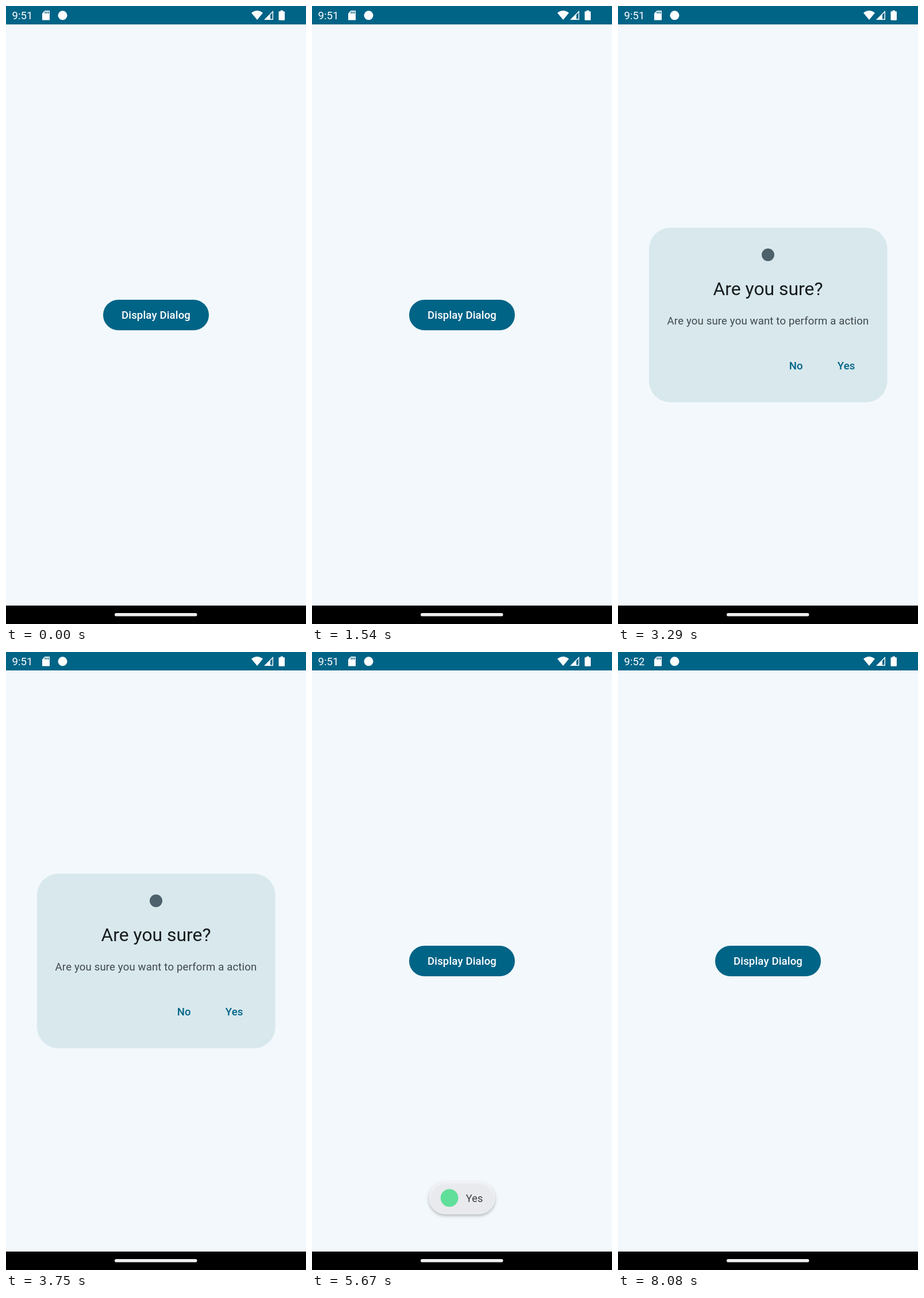
An HTML page with a canvas that plays this animation: 522 by 1073 pixels, repeating every 8120 ms.

```html
<!DOCTYPE html>
<html lang="en">
<head>
<meta charset="utf-8">
<title>Confirm dialog</title>
<style>
html, body { margin: 0; width: 100%; height: 100%; overflow: hidden; background: #f2f8fb; }
canvas { display: block; width: 522px; height: 1073px; }
</style>
</head>
<body>
<canvas id="stage" width="522" height="1073"></canvas>
<script>
const W = 522, H = 1073, LOOP = 8120;
const g = document.getElementById('stage').getContext('2d');
const PRIMARY = '#006487';

// Event times in ms
const T = {
  press: 2690, dialogIn: 2960,
  yesPress: 5305, dialogOut: 5450,
  toastIn: 5580, clock: 5900, toastOut: 7750
};

const clamp = v => Math.max(0, Math.min(1, v));
const part = (t, start, length) => clamp((t - start) / length);
const easeOut = p => 1 - (1 - p) ** 3;
const easeIn = p => p * p;

function box(x, y, w, h, r, color) {
  g.beginPath();
  g.roundRect(x, y, w, h, r);
  g.fillStyle = color;
  g.fill();
}

function circle(x, y, r, color) {
  g.beginPath();
  g.arc(x, y, r, 0, Math.PI * 2);
  g.fillStyle = color;
  g.fill();
}

function polygon(points, color) {
  g.beginPath();
  points.forEach(([x, y]) => g.lineTo(x, y));
  g.closePath();
  g.fillStyle = color;
  g.fill();
}

function label(text, x, y, { size = 18.6, weight = 400, color = '#fff', spacing = 0, align = 'center' } = {}) {
  g.font = `${weight} ${size}px Roboto, sans-serif`;
  g.letterSpacing = spacing + 'px';
  g.textAlign = align;
  g.fillStyle = color;
  g.fillText(text, x, y);
}

// Draws a group with opacity and scale around a centre
function group(cx, cy, scale, alpha, draw) {
  if (alpha <= 0) return;
  g.save();
  g.globalAlpha = alpha;
  g.translate(cx, cy);
  g.scale(scale, scale);
  g.translate(-cx, -cy);
  draw();
  g.restore();
}

// Soft-edged touch ripple clipped to a pill
function ripple(x, y, w, h, from, radius, p, rgb, alpha) {
  if (p <= 0 || alpha <= 0) return;
  const cx = from[0] + (x + w / 2 - from[0]) * p;
  const cy = from[1] + (y + h / 2 - from[1]) * p;
  const r = 5 + radius * p;
  const fill = g.createRadialGradient(cx, cy, 0, cx, cy, r);
  fill.addColorStop(0, `rgba(${rgb},${alpha})`);
  fill.addColorStop(0.7, `rgba(${rgb},${alpha})`);
  fill.addColorStop(1, `rgba(${rgb},0)`);
  box(x, y, w, h, h / 2, fill);
}

function statusBar(t) {
  g.fillStyle = PRIMARY;
  g.fillRect(0, 0, W, 32);
  label(t < T.clock ? '9:51' : '9:52', 10.5, 23, { align: 'left' });

  // Memory card
  polygon([[67.5, 8], [76, 8], [76, 24.5], [63, 24.5], [63, 13]], '#fff');
  g.fillStyle = PRIMARY;
  [67.5, 70.3, 73.1].forEach(x => g.fillRect(x, 9.5, 1.5, 3.5));

  circle(98.5, 16.3, 8, '#fff');

  // Wi-Fi fan
  g.beginPath();
  g.moveTo(437, 24);
  g.lineTo(427, 12);
  g.quadraticCurveTo(437, 4, 447, 12);
  g.closePath();
  g.fillStyle = '#fff';
  g.fill();

  // Signal
  polygon([[449, 24], [465, 8], [465, 24]], '#fff');
  polygon([[460, 15], [463.6, 11.4], [463.6, 22.5], [460, 22.5]], PRIMARY);

  // Battery
  box(474.5, 9.2, 10.5, 15.6, 1.2, '#fff');
  g.fillRect(477.6, 7.6, 4.4, 2);
}

function navBar() {
  g.fillStyle = '#000';
  g.fillRect(0, 1041, W, 32);
  box(189, 1054, 143.5, 5.6, 2.8, '#f1eef2');
}

function mainButton(t) {
  box(169, 510, 184, 53, 26.5, PRIMARY);
  const fade = 1 - part(t, 2960, 250);
  ripple(169, 510, 184, 53, [288, 542], 128, easeOut(part(t, T.press, 270)), '255,255,255', 0.13 * fade);
  label('Display Dialog', 261, 543.3, { weight: 500, spacing: 0.133 });
}

function dialog(t) {
  if (t < T.dialogIn || t > T.dialogOut + 220) return;
  const shown = easeOut(part(t, T.dialogIn, 150));
  const hidden = easeOut(part(t, T.dialogOut, 150));
  const grow = easeOut(part(t, T.dialogIn, 220));
  const shrink = easeOut(part(t, T.dialogOut, 220));
  const scale = 0.9 + 0.1 * grow - 0.1 * shrink;
  group(261, 536.5, scale, shown * (1 - hidden), () => {
    box(54, 385, 414.5, 303, 37, '#d8e8ed');
    circle(261, 432, 11, '#4d616c');
    label('Are you sure?', 261, 501.5, { size: 31.9, color: '#171b1d' });
    label('Are you sure you want to perform a action', 261, 553.3, { color: '#40484b', spacing: 0.15 });
    ripple(359, 598, 77, 53, [410, 635], 52, easeOut(part(t, T.yesPress, 350)), '0,80,100', 0.12);
    const action = { weight: 500, color: PRIMARY, spacing: 0.133 };
    label('No', 309.7, 630.8, action);
    label('Yes', 397.2, 630.8, action);
  });
}

function toast(t) {
  const shown = easeOut(part(t, T.toastIn, 220));
  const hidden = easeIn(part(t, T.toastOut, 220));
  const alpha = shown * (1 - hidden);
  group(261, 948, 0.9 + 0.1 * alpha, alpha, () => {
    g.shadowColor = 'rgba(0,0,0,0.32)';
    g.shadowBlur = 5;
    g.shadowOffsetY = 2.5;
    box(202, 919, 118, 58, 29, '#f6f7fa');
    g.shadowColor = 'transparent';
    circle(238.7, 947.8, 15.7, '#3ddc84');
    label('Yes', 268, 954.8, { color: '#111416', align: 'left' });
  });
}

function frame(now) {
  const t = now % LOOP;
  g.fillStyle = '#f2f8fb';
  g.fillRect(0, 0, W, H);
  mainButton(t);
  dialog(t);
  toast(t);
  statusBar(t);
  navBar();
}

const start = performance.now();
function tick() {
  frame(performance.now() - start);
  requestAnimationFrame(tick);
}
tick();
</script>
</body>
</html>
```
